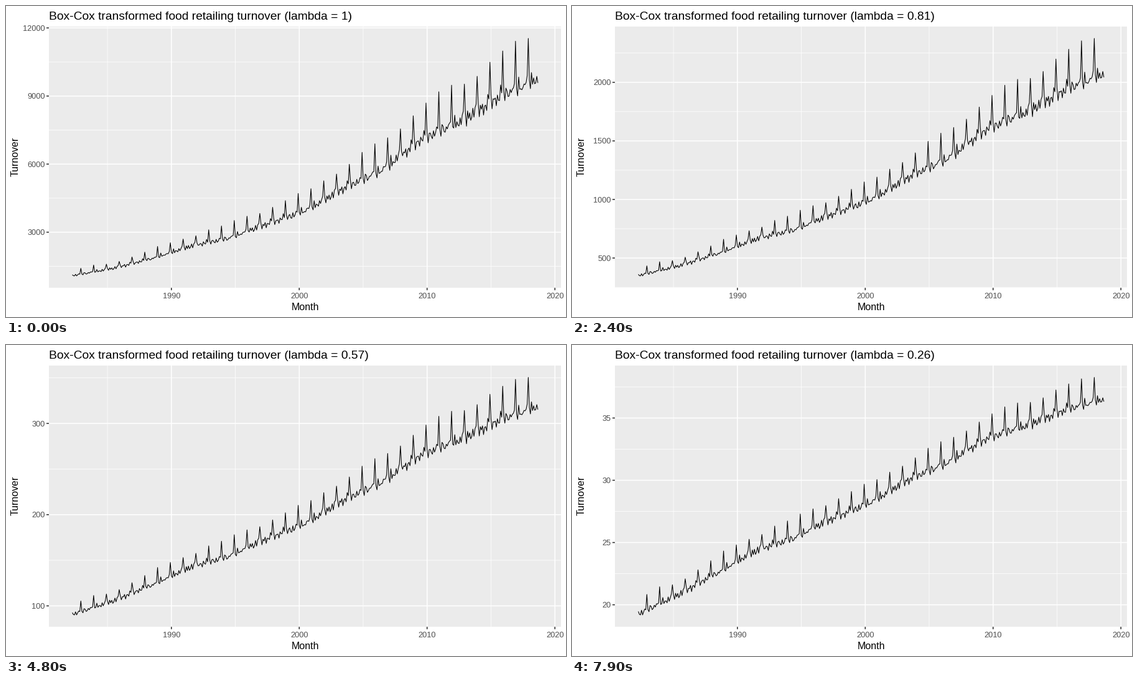
Recreate the animation shown at these times as a matplotlib script. Size 900 px wide and 500 px high, loop 8000 ms.

```python
import math
import numpy as np
import matplotlib.pyplot as plt
from matplotlib.animation import FuncAnimation
from matplotlib.collections import LineCollection
from matplotlib.patches import Rectangle

plt.rcParams["font.family"] = "Liberation Sans"

W, H, DPI = 900, 500, 72
LEFT, RIGHT, TOP, BOTTOM = 69, 892, 33, 453
FRAMES, INTERVAL, HOLD = 80, 100, 5
Y_MIN, Y_MAX = 1075, 11540

MONTHS = np.arange("1982-04", "2018-10", dtype="datetime64[M]")
COUNT = len(MONTHS)

# Trend every three years from mid 1982, and the share of each calendar month
TREND = [1092, 1400, 1825, 2360, 2720, 3345, 3920, 4895, 5704, 7040, 7814, 8880, 9678]
SEASON = [1.018, 0.962, 1.027, 0.995, 1, 0.972, 1, 1.005, 0.988, 1.027, 1.027, 1.205]
# Extra trade per weekday, Monday first
WEEKDAY = np.array([-0.3, -0.2, 0, 0.35, 0.45, 0.25, -0.55])


def trading_days():
    """Relative gain from the weekdays that occur five times in a month."""
    first = MONTHS.astype("datetime64[D]")
    days = ((MONTHS + 1).astype("datetime64[D]") - first).astype(int)
    weekday = (first.astype(int) + 3) % 7
    gain = sum(np.where(days > 28 + i, WEEKDAY[(weekday + i) % 7], 0) for i in range(3))
    return gain / days + np.where(days == 29, 0.022, 0)


def make_turnover():
    n = np.arange(COUNT)
    trend = np.interp(n, 3 + 36 * np.arange(len(TREND)), TREND)
    fade = 1 - 0.45 * n / COUNT
    noise = np.random.default_rng(4).normal(0, 0.004, COUNT)
    y = trend * np.array(SEASON)[(n + 3) % 12] * (1 + trading_days() * fade + noise)
    return Y_MIN + (y - y.min()) * (Y_MAX - Y_MIN) / (y.max() - y.min())


def pretty_breaks(dmin, dmax, m=5):
    """Extended Wilkinson labelling."""
    qs = [1, 5, 2, 2.5, 4, 3]
    span = dmax - dmin
    best, found = -2.0, None

    def score(s, c, d):
        return 0.25 * s + 0.2 * c + 0.5 * d + 0.05

    for j in range(1, 8):
        for i, q in enumerate(qs):
            smax = 2 - i / 5 - j
            if score(smax, 1, 1) < best:
                return found
            for k in range(2, 30):
                dens_max = 2 - (k - 1) / (m - 1) if k >= m else 1
                if score(smax, 1, dens_max) < best:
                    break
                z = math.ceil(math.log10(span / (k + 1) / j / q))
                while True:
                    step = j * q * 10.0 ** z
                    half = max(0, (step * (k - 1) - span) / 2)
                    cover_max = 1 - half ** 2 / (0.1 * span) ** 2
                    if score(smax, cover_max, dens_max) < best:
                        break
                    lo = math.floor(dmax / step) * j - (k - 1) * j
                    hi = math.ceil(dmin / step) * j
                    for start in range(lo, hi + 1):
                        lmin = start * step / j
                        lmax = lmin + step * (k - 1)
                        zero = start % j == 0 and lmin <= 0 <= lmax
                        s = smax - 1 + zero
                        c = 1 - 0.5 * ((dmax - lmax) ** 2 + (dmin - lmin) ** 2) / (0.1 * span) ** 2
                        r = (k - 1) / (lmax - lmin)
                        rt = (m - 1) / (max(lmax, dmax) - min(lmin, dmin))
                        total = score(s, c, 2 - max(r / rt, rt / r))
                        if total > best:
                            best, found = total, (lmin, step, k)
                    z += 1
    return found


turnover = make_turnover()
pad_x = (RIGHT - LEFT) / 22
pad_y = (BOTTOM - TOP) / 22


def month_x(n):
    return LEFT + 0.2 + pad_x + n * (RIGHT - LEFT - 2 * pad_x) / (COUNT - 1)


def year_x(year):
    return month_x((year - 1982) * 12 - 3)


fig = plt.figure(figsize=(W / DPI, H / DPI), dpi=DPI, facecolor="white")
ax = fig.add_axes([0, 0, 1, 1])
ax.set_xlim(0, W)
ax.set_ylim(H, 0)
ax.axis("off")

panel = Rectangle((LEFT, TOP), RIGHT - LEFT, BOTTOM - TOP, fc="#EBEBEB", ec="none", zorder=0)
ax.add_patch(panel)


def segments(width, color, z, clip=True):
    lines = LineCollection([], linewidths=width, colors=color, zorder=z, capstyle="butt")
    lines.set_snap(False)
    ax.add_collection(lines, autolim=False)
    if clip:
        lines.set_clip_path(panel)
    return lines


def vertical(xs, y0=TOP, y1=BOTTOM):
    return [[(x, y0), (x, y1)] for x in xs]


def horizontal(ys, x0=LEFT, x1=RIGHT):
    return [[(x0, y), (x1, y)] for y in ys]


minor_y = segments(0.78, "white", 1)
minor_x = segments(0.78, "white", 1)
major_y = segments(1.55, "white", 2)
major_x = segments(1.55, "white", 2)
ticks_y = segments(1.55, "#333333", 4, clip=False)
ticks_x = segments(1.55, "#333333", 4, clip=False)

decades = range(1990, 2021, 10)
decade_x = [year_x(y) for y in decades]
major_x.set_segments(vertical(decade_x))
minor_x.set_segments(vertical([year_x(y - 5) for y in decades]))
ticks_x.set_segments(vertical(decade_x, BOTTOM, BOTTOM + 4))
for year, x in zip(decades, decade_x):
    ax.text(x + 0.2, 470, str(year), size=12.8, color="#4D4D4D", ha="center", va="baseline")

ax.text(481, 489, "Month", size=16, ha="center", va="baseline")
ax.text(20, 242.5, "Turnover", size=16, rotation=90, rotation_mode="anchor",
        ha="center", va="baseline")
title = ax.text(LEFT, 22, "", size=19.2, ha="left", va="baseline")
labels = [ax.text(62.5, 0, "", size=12.8, color="#4D4D4D", ha="right", va="baseline")
          for _ in range(10)]
curve, = ax.plot(month_x(np.arange(COUNT)), np.zeros(COUNT), color="black",
                 lw=1.07, solid_joinstyle="round", solid_capstyle="butt", zorder=3)
curve.set_snap(False)


def update(frame):
    step_no = max(0, frame - HOLD)
    lam = 1 - 0.01009 * step_no
    z = (turnover ** lam - 1) / lam
    lo, hi = z.min(), z.max()
    pad = 0.05 * (hi - lo)
    scale = (BOTTOM - TOP - 2 * pad_y) / (hi - lo)

    def to_y(v):
        return BOTTOM - pad_y - (v - lo) * scale

    start, step, count = pretty_breaks(lo - pad, hi + pad)
    marks = [start + step * i for i in range(count)]
    marks = [v for v in marks if lo - pad <= v <= hi + pad]
    halves = [marks[0] - step / 2] + [v + step / 2 for v in marks]
    ys = [to_y(v) for v in marks]

    curve.set_ydata(to_y(z))
    major_y.set_segments(horizontal(ys))
    minor_y.set_segments(horizontal([to_y(v) for v in halves]))
    ticks_y.set_segments(horizontal(ys, LEFT - 4, LEFT))

    digits = 0 if all(abs(v - round(v)) < 1e-6 for v in marks) else 1
    for text in labels:
        text.set_text("")
    for text, v, y in zip(labels, marks, ys):
        text.set_text(f"{v:.{digits}f}")
        text.set_y(y + 4.6)
    shown = round(1 - 0.01 * step_no, 2)
    title.set_text(f"Box-Cox transformed food retailing turnover (lambda = {shown:g})")
    return [curve, major_y, minor_y, ticks_y, title, *labels]


anim = FuncAnimation(fig, update, frames=FRAMES, interval=INTERVAL,
                     repeat=True, repeat_delay=0, blit=False)
plt.show()
```
